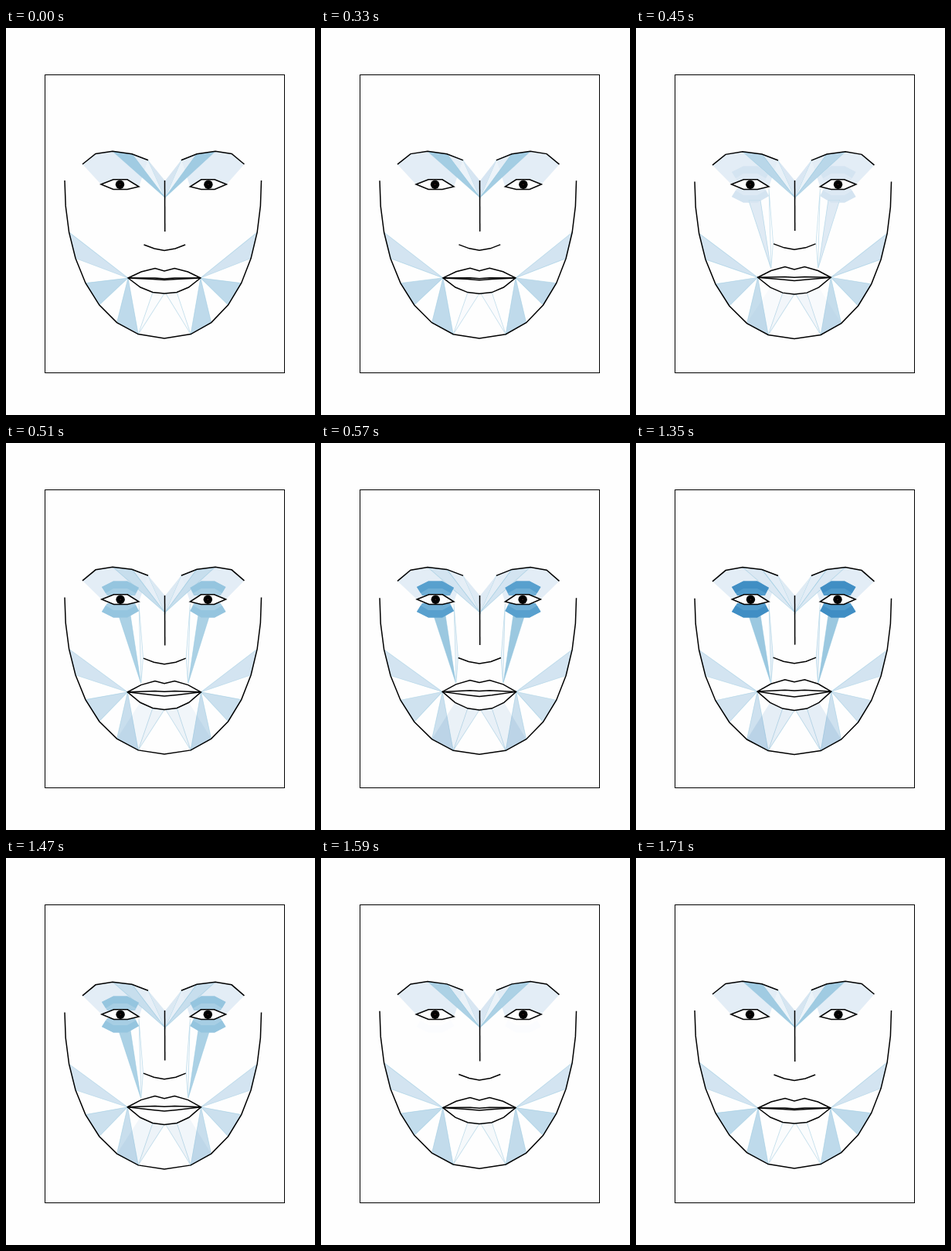
Animation, 400 px wide and 500 px high, one loop 2040 ms. Source, as an HTML page with a canvas:

```html
<!DOCTYPE html>
<html lang="en">
<head>
<meta charset="utf-8">
<title>Face strain</title>
<style>
  html, body { margin: 0; width: 100%; height: 100%; overflow: hidden; background: #fefefe; }
  canvas { display: block; width: 400px; height: 500px; }
</style>
</head>
<body>
<canvas id="stage" width="400" height="500"></canvas>
<script>
const ctx = document.getElementById('stage').getContext('2d');
const LOOP = 2040, STEP = 60, STEPS = 7, OPEN_AT = 330, CLOSE_AT = 1350;
const PAPER = '#fefefe', INK = '#000';
const BLUES = ['#ffffff', '#d8e6f2', '#9ecae1', '#5ba3d0', '#3787c0']
  .map(hex => [1, 3, 5].map(i => parseInt(hex.slice(i, i + 2), 16)));

const mix = (a, b, p) => a + (b - a) * p;
const clamp = (v, lo, hi) => Math.min(hi, Math.max(lo, v));

// The head is turned a little, so the far half is slightly narrower.
const mirror = points => points.map(([x, y]) => [403.5 - .96 * x, y]);
const whole = half => [...half, ...mirror(half.slice(0, -1)).reverse()];

function strainColor(v) {
  const place = clamp(v, 0, 1) * (BLUES.length - 1);
  const i = Math.min(Math.floor(place), BLUES.length - 2);
  return `rgb(${BLUES[i].map((c, k) => Math.round(mix(c, BLUES[i + 1][k], place - i)))})`;
}

// Left half of the jaw: a superellipse from the temple to the chin.
function jawHalf(p) {
  return Array.from({ length: 9 }, (_, i) => {
    const u = i / 8;
    const rise = Math.sin(u * (.8 + .2 * u) * Math.PI / 2);
    const reach = (1 - rise ** 2.15) ** (1 / 2.15);
    return [205 - 129 * reach, 197 + 204 * rise + p * mix(4, 1.5, u * u)];
  });
}

// Lips lift by 2 at the corner and by `shift` at the middle.
function lipHalf(points, shift, p) {
  return [[158, 323], ...points].map(([x, y]) => {
    const t = ((x - 158) / 47) ** .6;
    return [x - p * (1 - t), y + p * mix(-2, shift, t)];
  });
}

function buildHalf(p) {
  return {
    jaw: jawHalf(p),
    brow: [[99, 176], [116, 162.5], [138, 159.3], [163, 162.7], [184, 170.8]]
      .map(([x, y]) => [x, y + p * mix(.7, 3, ((184 - x) / 85) ** 2)]),
    eye: [[123, 202], [139, 195.8], [157, 195.8], [172, 205], [157, 208.5], [139, 208.5]]
      .map(([x, y]) => [x + p * (172 - x) / 33, y]),
    bridge: [[205.5, 197], [205.7, 263 - 2.5 * p]],
    nostril: [[178.5 - p, 280 - 3 * p], [192 - p, 285 - 3 * p], [205, 287.5 - 3 * p]],
    upperLip: lipHalf([[175, 315], [193, 310.5], [205, 314]], -5.5, p),
    lowerLip: lipHalf([[174, 335], [190, 341.5], [205, 343]], 2.6, p),
    innerTop: lipHalf([[193, 323], [205, 324]], -4.3, p),
    innerBottom: lipHalf([[190, 324.5], [205, 325.5]], 2.5, p),
    pupil: [[147.5 + p, 202.3]]
  };
}

function trace(points, closed) {
  ctx.beginPath();
  points.forEach(([x, y]) => ctx.lineTo(x, y));
  if (closed) ctx.closePath();
}

function fill(points, color) {
  trace(points, true);
  ctx.fillStyle = color;
  ctx.fill();
}

function line(points, closed) {
  trace(points, closed);
  ctx.strokeStyle = INK;
  ctx.lineWidth = 1.5;
  ctx.stroke();
}

function patch(points, strain, edge = true) {
  if (strain <= 0) return;
  fill(points, strainColor(strain));
  if (!edge) return;
  ctx.strokeStyle = 'rgba(140,195,222,.5)';
  ctx.lineWidth = .8;
  ctx.stroke();
}

function drawStrain(half, side, p) {
  const { jaw, brow, eye, lowerLip: lip, bridge } = half;
  const show = (points, from, to, edge) => patch(side(points), mix(from, to, p), edge);
  const corner = lip[0], root = [205.7, 219];

  ctx.globalCompositeOperation = 'darken';
  show([...brow, eye[3], eye[2], eye[1], eye[0]], .18, .18, false);
  show([brow[3], brow[4], root], .12, .18);
  show([brow[4], bridge[0], root], .26, .2, false);
  show([brow[2], brow[3], root], .49, .22);

  show([jaw[2], jaw[3], corner], .27, .27);
  show([jaw[4], jaw[5], corner], .36, .27);
  show([jaw[6], jaw[7], corner], .36, .29);

  ctx.globalCompositeOperation = 'multiply';
  show([jaw[6], lip[1], lip[2], jaw[7]], -.05, .17, false);
  show([jaw[7], lip[2], lip[3]], .02, .17);

  ctx.globalCompositeOperation = 'darken';
  show([[172, 208], [177.5, 277], [175, 310]], -.1, .16);
  patch(side([[145.5, 222], [161, 222], [174.5, 310]]), Math.min(.51, mix(-.2, .85, p)));

  const crease = [[124, 186], [139, 178.5], [157, 178.5], [172, 187]];
  const lid = [...crease, [167, 197], [131, 197]];
  const rim = [...crease, [168, 194], [157, 188], [139, 188], [129, 194]];
  const below = points => points.map(([x, y]) => [x, 404 - y]);
  for (const place of [points => points, below]) {
    show(place(lid), -.2, .88, false);
    show(place(rim), -.2, 1, false);
  }
  ctx.globalCompositeOperation = 'source-over';
}

function drawDot([x, y], radius, color) {
  ctx.beginPath();
  ctx.arc(x, y, radius, 0, 2 * Math.PI);
  ctx.fillStyle = color;
  ctx.fill();
}

function draw(p) {
  const half = buildHalf(p);
  const sides = [points => points, mirror];
  const mouth = [...whole(half.upperLip), ...whole(half.lowerLip).reverse()];

  ctx.fillStyle = PAPER;
  ctx.fillRect(0, 0, 400, 500);
  sides.forEach(side => drawStrain(half, side, p));

  fill(mouth, PAPER);
  line(mouth, true);
  for (const name of ['jaw', 'nostril', 'innerTop', 'innerBottom']) line(whole(half[name]));
  line(half.bridge);

  for (const side of sides) {
    const eye = side(half.eye), [pupil] = side(half.pupil);
    fill(eye, PAPER);
    line(eye, true);
    line(side(half.brow));
    drawDot(pupil, 5.7, INK);
    drawDot(pupil, .8, '#4a2222');
  }

  ctx.lineWidth = 1;
  ctx.strokeRect(50.5, 60.5, 310, 385);
}

function tension(t) {
  const start = t < CLOSE_AT ? OPEN_AT : CLOSE_AT;
  const step = clamp(Math.floor((t - start) / STEP) + 1, 0, STEPS);
  const eased = (1 - Math.cos(Math.PI * step / STEPS)) / 2;
  return t < CLOSE_AT ? eased : 1 - eased;
}

const began = performance.now();
function frame() {
  draw(tension((performance.now() - began) % LOOP));
  requestAnimationFrame(frame);
}
frame();
</script>
</body>
</html>
```
